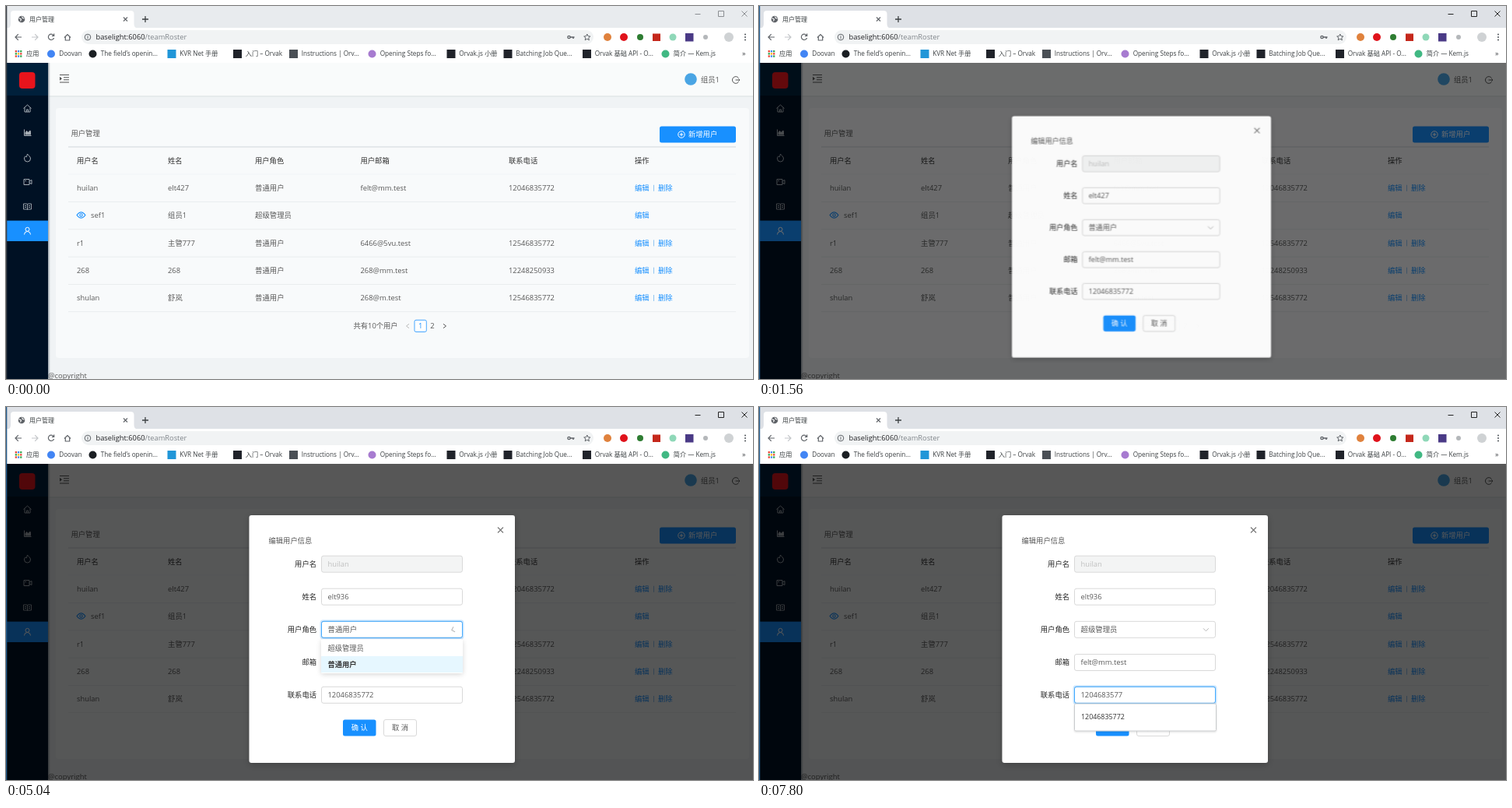
An HTML page for the animation above (8 s loop, 960 by 479 pixels).

```html
<!DOCTYPE html>
<html lang="zh-CN">
<head>
<meta charset="utf-8">
<title>用户管理</title>
<style>
html, body { margin: 0; width: 100%; height: 100%; overflow: hidden; background: #fff; }
svg { display: block; width: 100vw; height: 100vh; }
text { font-family: "Open Sans", "Noto Sans CJK SC", "Noto Sans CJK", "Noto Sans", sans-serif; white-space: pre; }
</style>
</head>
<body>
<svg id="stage" viewBox="0 0 960 479" xmlns="http://www.w3.org/2000/svg"></svg>
<script>
const LOOP = 8000, STEP = 60;
const BLUE = '#1890ff';
const PHONE = '12046835772', MAIL = 'felt@mm.test', OLD_NAME = 'elt427';
const ADMIN = '超级管理员', NORMAL = '普通用户';
const CLICK = { x: 815, y: 234 };

// Markup helpers
const attrs = o => Object.entries(o).map(([k, v]) => `${k}="${v}"`).join(' ');
const rect = (x, y, w, h, fill, o = {}) =>
  `<rect x="${x}" y="${y}" width="${w}" height="${h}" fill="${fill}" ${attrs(o)}/>`;
const circle = (x, y, r, fill, o = {}) =>
  `<circle cx="${x}" cy="${y}" r="${r}" fill="${fill}" ${attrs(o)}/>`;
const line = (d, stroke, w = 1, o = {}) =>
  `<path d="${d}" fill="none" stroke="${stroke}" stroke-width="${w}" ${attrs(o)}/>`;
const group = (body, o = {}) => `<g ${attrs(o)}>${body}</g>`;
// Text placed by the vertical middle of its line
const text = (x, mid, s, fill = '#595959', size = 9.3, o = {}) =>
  `<text x="${x}" y="${mid + size * .36}" font-size="${size}" fill="${fill}" ${attrs(o)}>${s}</text>`;

const clamp = v => Math.max(0, Math.min(1, v));
const ramp = (t, from, len) => clamp((t - from) / len);
const easeOut = (p, n = 3) => 1 - (1 - p) ** n;
// Rises after a and falls after b
const pulse = (t, a, b, len = 240) => easeOut(ramp(t, a, len)) * (1 - easeOut(ramp(t, b, len)));

function browser() {
  const ink = '#5f6368';
  let s = rect(0, 0, 960, 28.5, '#dee1e6', { id: 'strip' });
  s += '<path d="M2 28.5Q6 28 6 23V10Q6 6 10 6H160Q164.500 6 164.500 10V23Q164.500 28 169 28.500Z" fill="#fff"/>';
  s += rect(0, 28, 960, 45, '#fff');
  s += circle(20, 17, 4.3, '#5f6368') + line('M16.500 15.500l3 1.500l-1 2.500M20.500 13.500l1 2l2 .5', '#fff', 1.1);
  s += text(30, 17, '用户管理', '#3c4043', 8);
  s += line('M151 14.500l5 5m0-5l-5 5', ink, 1.1);
  s += line('M175 17h8m-4-4v8', '#3c4043', 1.3);
  s += group(line('M885.500 10.500h7', 'currentColor') + line('M915.500 6.500h7v7h-7z', 'currentColor')
    + line('M945.500 6.500l7 7m0-7l-7 7', 'currentColor'), { id: 'controls' });

  s += rect(97, 31, 658, 18, '#f1f3f4', { rx: 9 });
  s += line('M20 40h-8m3.800-3.800l-3.800 3.800l3.800 3.800', ink, 1.2);
  s += line('M33 40h8m-3.800-3.800l3.800 3.800l-3.800 3.800', '#c3c6c9', 1.2);
  s += line('M61 37.500a3.700 3.700 0 1 0 .6 3.500M61.700 35.500v2.800h-2.800', ink, 1.2);
  s += line('M75 40.500l4-4l4 4M76.300 40v4h5.400v-4', ink, 1.2);
  s += circle(105, 40, 3.8, 'none', { stroke: ink }) + line('M105 39.300v2.700m0-4v.9', ink, 1);
  s += text(115.500, 40, 'baselight:6060<tspan fill="#80868b">/teamRoster</tspan>', '#202124', 9.3);
  s += circle(723.500, 40, 1.6, 'none', { stroke: ink, 'stroke-width': 1.4 }) + line('M725 40h5.500m-1.500 0v2', ink, 1.5);
  s += line('M746.800 36l1.200 2.700l2.900.3l-2.200 1.900l.7 2.900l-2.600-1.500l-2.600 1.500l.7-2.900l-2.200-1.900l2.900-.3z', ink);

  s += circle(773, 40, 5, '#e0823d') + circle(794, 40, 5, '#e0131c') + circle(815, 40, 4, '#2e7d32')
    + rect(831, 35.500, 10, 9.500, '#c5281c') + circle(857, 40, 4.5, '#8fd8b8')
    + rect(873, 35, 10.500, 10.500, '#4a3a86') + circle(899, 40, 3, '#b4b7ba') + circle(929, 40, 6, '#cfd2d4');
  for (const y of [36.500, 40, 43.500]) s += circle(950, y, 1.1, ink);

  const dots = ['#ea4335', '#fbbc05', '#34a853', '#4285f4'];
  for (let i = 0; i < 9; i++) s += rect(11.700 + i % 3 * 3.2, 57 + (i / 3 | 0) * 3.2, 2.3, 2.3, dots[(i * 3 + (i / 3 | 0)) % 4]);
  s += text(26, 61.500, '应用', '#3c4043', 8.2);
  const marks = [
    [58, '#4285f4', 1, 'Doovan'], [111.500, '#1b1f23', 1, 'The field’s openin...'],
    [213, '#2196d8', 0, 'KVR Net 手册'], [297.500, '#20232a', 0, '入门 – Orvak'],
    [369.500, '#4a4f55', 0, 'Instructions | Orv...'], [470.500, '#a77bd0', 1, 'Opening Steps fo...'],
    [572, '#20232a', 0, 'Orvak.js 小册'], [645, '#20232a', 0, 'Batching Job Que...'],
    [746.500, '#20232a', 0, 'Orvak 基础 API - O...'], [847.500, '#41b883', 1, '简介 — Kem.js']];
  for (const [x, color, round, label] of marks) {
    s += round ? circle(x, 61.500, 5, color) : rect(x - 5.500, 56, 11, 11, color);
    s += text(x + 10.200, 61.500, label, '#3c4043', 8.2);
  }
  return s + text(946, 60.800, '»', '#3c4043', 9);
}

function sidebar() {
  const c = '#a6adb4';
  let s = rect(1, 73, 53, 406, '#001124') + rect(1, 73, 53, 42, '#00203b');
  s += rect(17, 85, 20.500, 21, '#e8141c', { rx: 4 });
  s += rect(1, 275.600, 53, 26.400, BLUE);
  s += line('M22.500 131.500l5-4.500l5 4.500M24 130.500v5.500h7v-5.500M26.500 136v-3h2v3', c);
  s += line('M23.500 158.500v8h9', c) + `<path d="M24.500 165.500v-3l2-2.500l2 2l2.500-2.500l1 1.500v4.500z" fill="${c}"/>`;
  s += line('M27.500 190c1 2 4 3 4 6a4 4 0 0 1-8 0c0-1.500.7-2.500 1.500-3.200c.5 1 1 1.200 1.200 1.200c.6-1 .8-2.500 1.300-4z', c);
  s += line('M23 222.500h7v7h-7zM30 225l3-1.500v5l-3-1.500M24.500 224.500h1.500', c);
  s += line('M22.500 254h4q1 0 1 1q0-1 1-1h4v7h-4q-1 0-1 1q0-1-1-1h-4zM27.500 255v6M24 256.500h2m-2 2h2m3-2h2m-2 2h2', c, .9);
  s += circle(27.500, 286.800, 2.500, 'none', { stroke: '#fff' }) + line('M23.500 293.500a4 4 0 0 1 8 0', '#fff');
  return s;
}

function page() {
  let s = rect(54, 73, 906, 406, '#f0f3f5') + rect(54, 115, 906, 2, '#e6ebec') + rect(54, 73, 906, 42, '#f9fbfb');
  s += rect(54, 73, 3, 406, 'url(#edge)');
  s += line('M69 88.500h12M74 91.700h7M74 94.800h7M69 98h12', '#555', 1.1) + '<path d="M69 90.800l3 2.500l-3 2.500z" fill="#555"/>';
  s += circle(880, 94, 7.800, '#4aa5e4') + text(893, 95, '组员1');
  s += line('M941.500 92.500a4.400 4.400 0 1 0 0 5M937.500 95h5.500m-1.500-1.500l1.500 1.500l-1.500 1.500', '#555');

  s += rect(64, 131, 891, 321, '#f8fafb', { rx: 4 }) + text(83.500, 164, '用户管理');
  s += rect(840, 154.400, 98, 21.100, BLUE, { rx: 2.5 });
  s += circle(868, 165, 4.200, 'none', { stroke: '#fff' }) + line('M865.800 165h4.400m-2.200-2.200v4.400', '#fff');
  s += text(877, 165, '新增用户', '#fff', 9.3, { 'font-weight': 500 });
  s += rect(80, 180.300, 858, 1.300, '#dbe0e3');
  s += rect(80, 216, 858, 35.300, '#e6f7ff', { id: 'hover', opacity: 0 });

  const cols = [91, 208, 320, 455.500, 646, 808];
  ['用户名', '姓名', '用户角色', '用户邮箱', '联系电话', '操作'].forEach((h, i) => s += text(cols[i], 198.700, h, '#333'));
  const rows = [
    ['huilan', OLD_NAME, NORMAL, MAIL, PHONE],
    ['sef1', '组员1', ADMIN, '', ''],
    ['r1', '主管777', NORMAL, '6466@5vu.test', '12546835772'],
    ['268', '268', NORMAL, '268@mm.test', '12248250933'],
    ['shulan', '舒岚', NORMAL, '268@m.test', '12546835772']];
  rows.forEach((row, r) => {
    const y = 233.800 + r * 35.300, self = r === 1;
    row.forEach((v, i) => s += text(cols[i] + (self && !i ? 18 : 0), y, v, '#595959', 9.4));
    s += text(808, y, '编辑', BLUE);
    if (!self) s += rect(832, y - 4, .8, 8, '#79b8ee') + text(838, y, '删除', BLUE);
    s += rect(80, y + 17.300, 858, .8, '#e6eaec');
  });
  s += rect(80, 215.700, 858, .6, '#eceff1');
  s += line('M91 268.500q5.500-7.500 11 0q-5.500 7.500-11 0z', BLUE, 1.1) + circle(96.500, 268.500, 1.700, 'none', { stroke: BLUE, 'stroke-width': 1.1 });

  s += text(446.500, 411, '共有10个用户');
  s += line('M518 408.300l-3.500 2.700l3.500 2.700', '#bbb') + line('M562 408.300l3.500 2.700l-3.500 2.700', '#555');
  s += rect(525, 403.300, 15.300, 15.200, '#fff', { rx: 2, stroke: BLUE, 'stroke-width': .8 });
  s += text(532.600, 410.700, '1', BLUE, 9.4, { 'text-anchor': 'middle' }) + text(545.300, 410.700, '2', '#555', 9.4);
  return s + text(54, 474.300, '@copyright', '#595959', 9.5);
}

const ROWS = { user: 201.700, name: 243.700, role: 285.800, mail: 328, phone: 369.800 };

function field(id, label, value) {
  const y = ROWS[id], off = id === 'user';
  return text(399, y, label, '#262626', 9.3, { 'text-anchor': 'end' })
    + rect(405.500, y - 10.500, 181, 21, off ? '#f3f4f4' : '#fff', { rx: 2.5, stroke: '#d9d9d9' })
    + group(rect(404.500, y - 11.500, 183, 23, 'none', { rx: 3, stroke: BLUE, 'stroke-opacity': .22, 'stroke-width': 2 })
      + rect(405.500, y - 10.500, 181, 21, 'none', { rx: 2.5, stroke: '#40a9ff' }), { id: id + 'Ring', opacity: 0 })
    + text(413.500, y, value, off ? '#bfbfbf' : '#595959', 9.4, { id: id + 'Text' })
    + line('', '#e0393e', .8, { id: id + 'Wave' })
    + rect(0, y - 7, .9, 14, '#222', { id: id + 'Caret', opacity: 0 });
}

const popup = (id, y, value) => group(
  rect(405.500, y, 182, 35, '#fff', { rx: 1.5, stroke: '#c8cbcd', filter: 'url(#soft)' })
  + text(414, y + 16.800, value, '#333', 8.900), { id, opacity: 0 });

function modal() {
  let s = rect(312.500, 139, 341.500, 318, '#fff', { rx: 3, filter: 'url(#drop)' });
  s += text(337.500, 172, '编辑用户信息') + line('M632 154.500l7 7m0-7l-7 7', '#777', 1.1);
  s += field('user', '用户名', 'huilan') + field('name', '姓名', OLD_NAME) + field('role', '用户角色', NORMAL)
    + field('mail', '邮箱', MAIL) + field('phone', '联系电话', PHONE);
  s += line('M571 284.300l3.400 3.400l3.400-3.400', '#b5b5b5', 1, { id: 'arrow' });
  s += rect(433, 401.500, 42.500, 21, BLUE, { rx: 2.5 })
    + text(454.200, 412, '确 认', '#fff', 9.3, { 'text-anchor': 'middle', 'font-weight': 500 });
  s += rect(485.500, 401.500, 42, 21, '#fff', { rx: 2.5, stroke: '#d9d9d9' })
    + text(506.500, 412, '取 消', '#595959', 9.3, { 'text-anchor': 'middle' });
  s += group(rect(405, 298.500, 182, 43.500, '#fff', { rx: 2.5, filter: 'url(#menuShadow)' })
    + rect(405, 299, 182, 21, '#e6f7ff', { id: 'itemA' }) + rect(405, 320, 182, 21, '#e6f7ff', { id: 'itemB' })
    + text(413.500, 309.300, ADMIN) + text(413.500, 330.300, NORMAL, '#333', 9.3, { 'font-weight': 600 }), { id: 'menu' });
  return s + popup('namePopup', 255, OLD_NAME) + popup('phonePopup', 381, PHONE);
}

const shadow = (id, dy, blur, a) => `<filter id="${id}" x="-20%" y="-40%" width="140%" height="190%">
  <feDropShadow dx="0" dy="${dy}" stdDeviation="${blur}" flood-color="#000" flood-opacity="${a}"/></filter>`;

document.getElementById('stage').innerHTML =
  `<defs>${shadow('drop', 2, 4, .22)}${shadow('menuShadow', 1.5, 3, .16)}${shadow('soft', 1, 1, .14)}
  <linearGradient id="edge"><stop stop-color="#9aa3ab"/><stop offset="1" stop-color="#9aa3ab" stop-opacity="0"/></linearGradient></defs>`
  + browser() + page() + sidebar()
  + rect(1, 73, 959, 406, '#000', { id: 'mask', opacity: 0 })
  + rect(0, 0, 1.300, 479, '#245a8a', { id: 'side' })
  + group(modal(), { id: 'modal' });

const parts = {};
document.querySelectorAll('[id]').forEach(n => parts[n.id] = n);
const set = (id, o) => { for (const k in o) parts[id].setAttribute(k, o[k]); };
const alpha = (id, v) => set(id, { opacity: v });
const write = (id, s) => { if (parts[id].textContent !== s) parts[id].textContent = s; };
const between = (t, a, b) => t >= a && t < b;

// Last value whose start time has passed
const valueAt = (t, keys) => keys.reduce((v, [start, next]) => t >= start ? next : v, '');

function wave(id, chars) {
  if (!chars) return set(id + 'Wave', { d: '' });
  const w = parts[id + 'Text'].getSubStringLength(0, chars);
  set(id + 'Wave', { d: `M413.500 ${ROWS[id] + 5.500}` + 'l1-1l1 1'.repeat(Math.round(w / 2)) });
}

function caret(id, on) {
  alpha(id + 'Caret', on ? 1 : 0);
  if (on) set(id + 'Caret', { x: 413.800 + parts[id + 'Text'].getComputedTextLength() });
}

function draw(ms) {
  const t = Math.floor(ms / STEP) * STEP;
  const active = t >= 840;
  set('strip', { fill: active ? '#dee1e6' : '#e8ebee' });
  set('controls', { color: active ? '#222' : '#8b8e92' });
  set('side', { fill: active ? '#245a8a' : '#3b4148' });
  alpha('hover', t < 1500 ? ramp(t, 360, 240) : 0);

  // The dialog grows out of the clicked link
  const shown = ramp(t, 1455, 210), open = easeOut(shown, 5), k = .2 + .8 * open;
  alpha('mask', .65 * easeOut(shown));
  alpha('modal', open);
  set('modal', { transform: `translate(${CLICK.x * (1 - k)} ${CLICK.y * (1 - k)}) scale(${k})` });

  write('nameText', valueAt(t, [[0, OLD_NAME], [2700, 'elt42'], [3180, 'elt4'], [3420, 'elt'],
    [3840, 'elt9'], [4080, 'elt93'], [4500, 'elt936']]));
  alpha('nameRing', pulse(t, 2040, 4860, 200));
  wave('name', between(t, 2400, 2700) ? 6 : 0);
  caret('name', between(t, 2160, 4920));
  alpha('namePopup', t < 3840 ? ramp(t, 2600, 160) : 1 - ramp(t, 3780, 160));

  write('roleText', t < 5820 ? NORMAL : ADMIN);
  alpha('roleRing', Math.max(.45 * pulse(t, 4440, 6060), pulse(t, 4860, 6060)));
  const menu = easeOut(ramp(t, 4860, 200), 4) * (1 - easeOut(ramp(t, 5800, 220)));
  alpha('menu', menu);
  set('menu', { transform: `translate(0 ${298 * .2 * (1 - menu)}) scale(1 ${.8 + .2 * menu})` });
  set('itemA', { fill: t < 5400 ? '#fff' : '#e6f7ff' });
  set('itemB', { fill: t < 5400 ? '#e6f7ff' : '#fafafa' });
  const turn = ramp(t, 4920, 300) * (1 - ramp(t, 5780, 300));
  set('arrow', { transform: `rotate(${180 * turn} 574.400 286)` });

  alpha('mailRing', pulse(t, 6060, 6920));
  wave('mail', between(t, 6240, 6960) ? 4 : 0);
  caret('mail', between(t, 6180, 6660));

  write('phoneText', t < 7740 ? PHONE : PHONE.slice(0, -1));
  alpha('phoneRing', pulse(t, 6960, LOOP));
  caret('phone', between(t, 7260, 7740));
  alpha('phonePopup', ramp(t, 7650, 150));
}

function tick() {
  draw(performance.now() % LOOP);
  requestAnimationFrame(tick);
}
tick();
</script>
</body>
</html>
```
